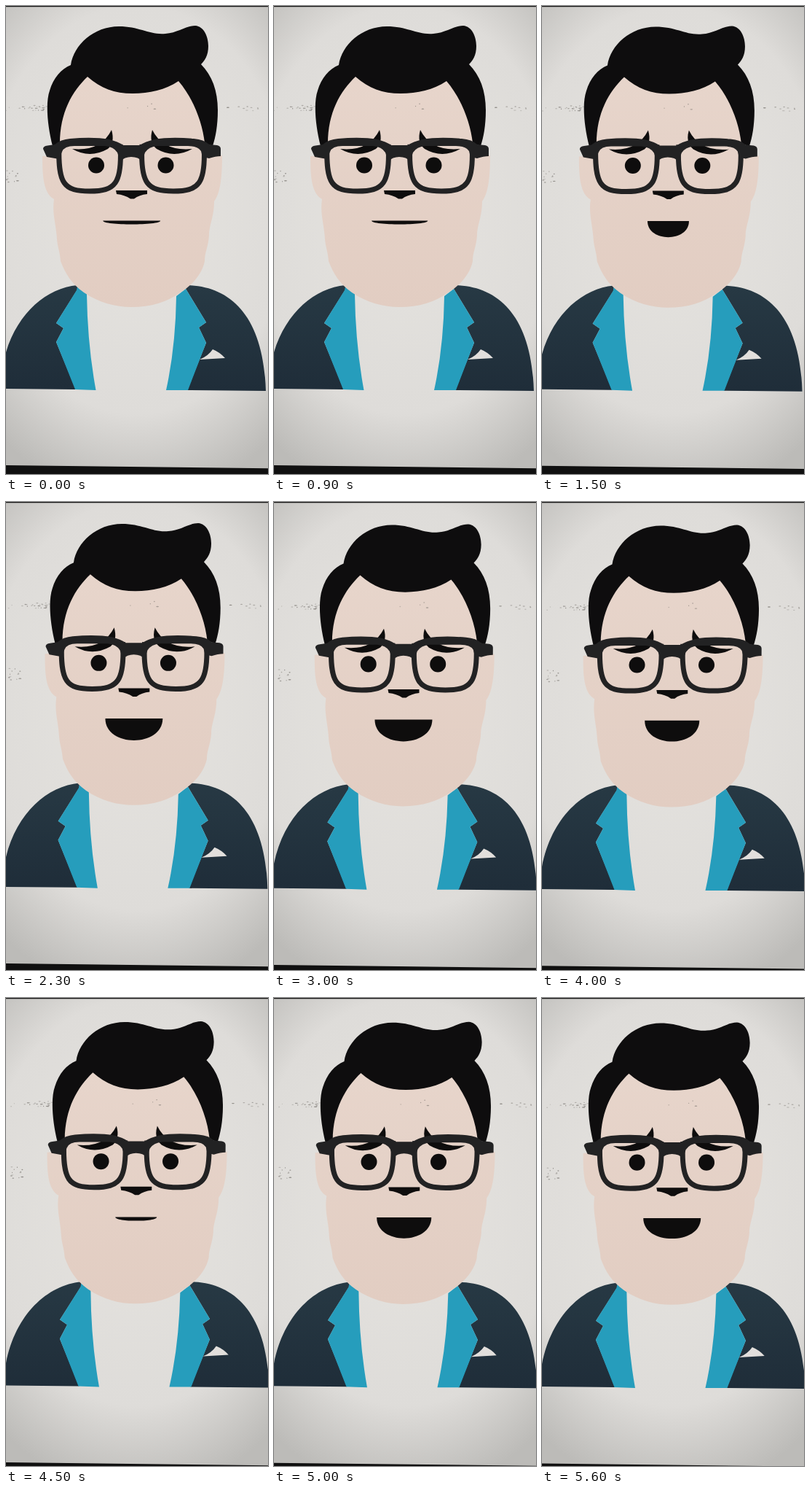
An HTML page for the animation above (5.7 s loop, 360x642 px).

```html
<!DOCTYPE html>
<html lang="en">
<head>
<meta charset="utf-8">
<title>Talking portrait</title>
<style>
html, body { margin: 0; width: 100%; height: 100%; overflow: hidden; background: #dddbd7; }
svg { display: block; width: 100%; height: 100%; }
</style>
</head>
<body>
<svg viewBox="0 0 360 642" preserveAspectRatio="none">
  <defs>
    <radialGradient id="paper" gradientUnits="userSpaceOnUse" cx="180" cy="280" r="400" gradientTransform="translate(45 0) scale(.75 1)">
      <stop offset="0" stop-color="#e5e3df"/>
      <stop offset=".7" stop-color="#dedcd9"/>
      <stop offset="1" stop-color="#bcbbb8"/>
    </radialGradient>
    <linearGradient id="skin" x1="0" y1="0" x2="0" y2="1">
      <stop offset="0" stop-color="#e7d5cb"/>
      <stop offset="1" stop-color="#e2cdc2"/>
    </linearGradient>
    <linearGradient id="cloth" x1="0" y1="0" x2="0" y2="1">
      <stop offset="0" stop-color="#273944"/>
      <stop offset="1" stop-color="#1f2d39"/>
    </linearGradient>
  </defs>
  <rect width="360" height="642" fill="url(#paper)"/>
  <g id="scene">
    <g fill="url(#cloth)">
      <path d="M98 383C45 388-5 440-8 525L96 526 69 461 79 442 69 435 98 389Z"/>
      <path d="M246 383C308 383 354 425 357 528L249 527 275 462 265 441 275 434 247 388Z"/>
    </g>
    <g fill="#269dbc">
      <path d="M98 385L97 390 69 435 79 442 69 461 95 526 123.500 527Q112 465 111 395Z"/>
      <path d="M234 398L247 388 275 434 265 441 275 462 250 527 220 527Q233 468 234 398Z"/>
    </g>
    <path d="M266 485Q278 480 284 471Q294 475 301 483Z" fill="#e2dfdc"/>

    <path fill="url(#skin)" d="M74 175L72 205 50 206C50 232 51 257 66 265C63 285 69 300 70 320C71 332 74 336 75 350
      C82 368 90 381 107 393C128 407 150 413 172 413C200 413 221 406 238 394C257 383 270 366 273 350
      C273 338 278 330 279 315C279 300 286 290 286 268C294 257 297 238 297 205L274 205 272 175
      C266 130 250 112 237 100L112 96C92 115 77 142 74 175Z"/>
    <g id="dust" fill="#6b6762"/>

    <path fill="#0e0d0e" d="M64 192C57 165 54 133 60 116C65 99 76 86 89 81C93 53 121 28 155 28C184 28 197 40 219 38
      C236 37 247 27 260 27C272 28 278 42 278 55C278 68 273 75 268 80C283 95 291 116 291 143C291 164 288 180 284 192
      L273 188C270 160 257 126 237 103C219 115 197 120 174 120C149 120 130 113 112 97C91 117 74 146 74 189Z"/>

    <g fill="#0e0d0d">
      <path d="M91 196Q130 200 145 170Q150 187 140 196Q115 210 91 196Z"/>
      <path d="M256 196Q216 200 201 170Q196 187 207 196Q231 210 256 196Z"/>
      <circle cx="124" cy="218.500" r="11"/>
      <circle cx="219.500" cy="218.500" r="11"/>
      <path d="M151 253H194V258Q183 259 176 264.500H171Q163 259 152 258Z"/>
      <path id="mouth"/>
    </g>

    <g fill="none" stroke="#222223" stroke-width="7">
      <path d="M73 190C71 245 80 254 115 254C150 254 160 244 157 190"/>
      <path d="M187 190C184 245 195 254 230 254C265 254 275 244 272 190"/>
    </g>
    <path fill="#222223" d="M51 196Q51 192 57 191.500L67 190Q75 183 88 182Q120 179 142 183Q154 186 161 191H184Q191 186 204 183
      Q226 179 258 182Q272 183 279 190L290 191Q295 192 295 196V206Q288 206 279 209L270 207 268 199Q264 192 250 192H208
      Q196 193 191 201L187 213Q182 207 172 207Q163 207 157 213L153 201Q148 193 136 192H94Q80 192 77 200L73 210 56 207Z"/>

    <path d="M-10 630L380 634.500V665H-10Z" fill="#101010"/>
  </g>
  <rect width="360" height="1.200" fill="#151515"/>
</svg>
<script>
const LOOP = 5700, STEP = 100;
const [scene, mouth, dust] = ['scene', 'mouth', 'dust'].map(id => document.getElementById(id));

let seed = 7;
function random() {
  seed = seed * 16807 % 2147483647;
  return seed / 2147483647;
}

function scatter(count, x, y, w, h) {
  for (let i = 0; i < count; i++) {
    const speck = document.createElementNS('http://www.w3.org/2000/svg', 'ellipse');
    const values = { cx: x + random() * w, cy: y + random() * h, rx: 0.5 + random() * 1.5, ry: 0.7, opacity: 0.2 + random() * 0.5 };
    for (const name in values) speck.setAttribute(name, values[name]);
    dust.append(speck);
  }
}
scatter(26, 0, 136, 56, 8);
scatter(12, 0, 226, 18, 16);
scatter(9, 293, 137, 60, 7);
scatter(4, 155, 134, 60, 8);

const ramp = (t, from, to) => Math.min(1, Math.max(0, (t - from) / (to - from)));
const smooth = u => u * u * (3 - 2 * u);

// The hand-held camera slides sideways once, then keeps sinking.
function drift(t) {
  const slide = smooth(ramp(t, 900, 3600));
  const sink = 3.8 * slide + 2.7 * ramp(t, 3600, 5600);
  return `matrix(1 0 ${-0.0067 * slide} ${1 + 0.003 * slide} ${8 * slide} ${sink})`;
}

// Regular syllables open the mouth; a slower beat puckers the lips.
function lips(t) {
  const beat = Math.abs(Math.sin(Math.PI * t / 890));
  const open = Math.sin(Math.PI / 2 * ramp(beat, 0.17, 1));
  const pucker = Math.cos(Math.PI * (t - 1500) / 3000) ** 12;
  const half = 39.5 - 11 * pucker;
  const depth = 5 + 25 * open * (1 - 0.28 * pucker);
  const left = 172.7 - half, right = 172.7 + half, top = 294.5, low = top + depth * 4 / 3;
  return `M${left} ${top}H${right}C${right} ${low} ${left} ${low} ${left} ${top}Z`;
}

function draw(time) {
  const t = Math.floor(time % LOOP / STEP) * STEP;
  scene.setAttribute('transform', drift(t));
  mouth.setAttribute('d', lips(t));
}

const start = performance.now();
function tick() {
  draw(performance.now() - start);
  requestAnimationFrame(tick);
}
tick();
</script>
</body>
</html>
```
